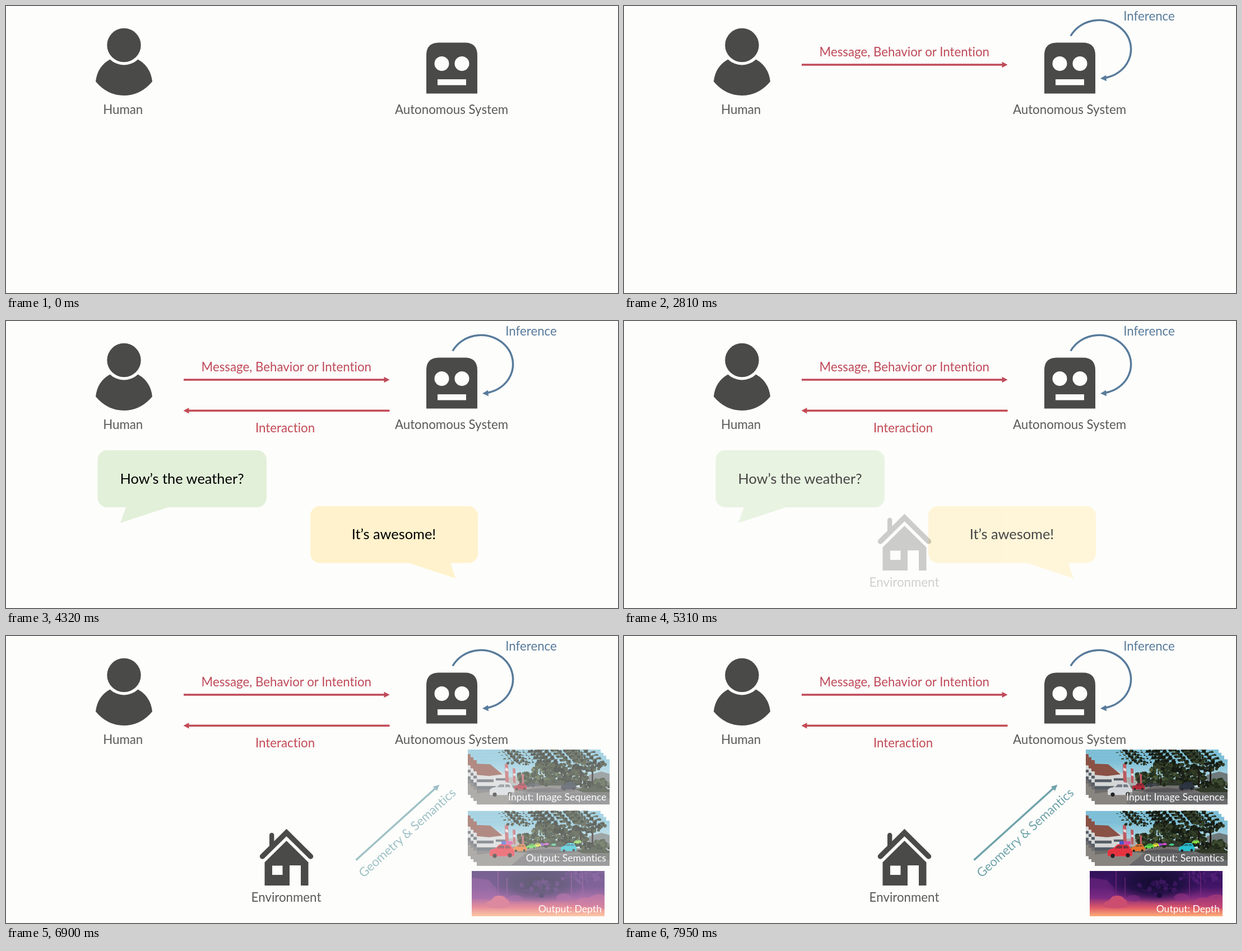
An HTML page that plays this animation: 1092 px wide and 513 px high, repeating every 7990 ms.

```html
<!DOCTYPE html>
<html lang="en">
<head>
<meta charset="utf-8">
<title>Human and autonomous system</title>
<style>
  html, body { margin: 0; width: 100%; height: 100%; overflow: hidden; background: #fdfdfb; }
  svg { display: block; width: 1092px; height: 513px; }
  text {
    font-family: Lato, Carlito, Calibri, sans-serif; font-size: 22.3px;
    font-variant-ligatures: none; text-anchor: middle;
  }
  .icon { fill: #4a4a49; }
  .label { fill: #595959; }
  .red { fill: #bf4a59; }
  .blue { fill: #587b9b; }
  .teal { fill: #6fa3aa; }
  .line { fill: none; stroke-width: 3.5; }
  .bubble text { font-size: 25.4px; fill: #000; }
  .caption { font-size: 17.6px; fill: #fff; text-anchor: end; }
  .step { opacity: 0; }
</style>
</head>
<body>
<svg viewBox="0 0 1092 513">
  <defs>
    <clipPath id="frame"><rect width="237" height="81"/></clipPath>
    <linearGradient id="sky" x2="0" y2="1">
      <stop stop-color="#79bdd6"/><stop offset=".6" stop-color="#c3e2e8"/>
    </linearGradient>
    <linearGradient id="road" x2="0" y2="1">
      <stop stop-color="#74716e"/><stop offset="1" stop-color="#67656a"/>
    </linearGradient>
    <linearGradient id="heat" x2="0" y2="1">
      <stop stop-color="#32115a"/><stop offset=".35" stop-color="#431568"/>
      <stop offset=".58" stop-color="#7d2a7f"/><stop offset=".8" stop-color="#dc5669"/>
      <stop offset="1" stop-color="#fdae78"/>
    </linearGradient>
    <radialGradient id="far">
      <stop stop-color="#120b2c"/><stop offset=".55" stop-color="#1d0f40" stop-opacity=".85"/>
      <stop offset="1" stop-color="#2a1150" stop-opacity="0"/>
    </radialGradient>
    <g id="car">
      <path d="M-22 9V1Q-20-3-12-4L-6-10Q-4-12 2-12H11Q16-12 19-4L22 0V8Q22 10 19 10H-20Z"/>
      <path d="M-9-4L-4-9H4V-4ZM6-4V-9H11Q14-9 15-4Z" fill="#26303a" opacity=".55"/>
      <circle cx="-13" cy="9" r="3.6" fill="#222"/><circle cx="14" cy="8" r="3.6" fill="#222"/>
    </g>
    <g id="street" clip-path="url(#frame)"></g>
  </defs>

  <g class="icon">
    <circle cx="210.5" cy="70" r="30.2"/>
    <path d="M185.5 95.5Q163 108 160 135Q181 160 210.5 160Q240 160 261 135Q258 108 235.5 95.5A36.5 36.5 0 0 1 185.5 95.5Z"/>
    <path fill-rule="evenodd" d="M750 156.5V88Q750 65.5 772 65.5H819Q841 65.5 841 88V156.5ZM764.5 103a13 13 0 1 0 26 0a13 13 0 1 0-26 0ZM800.5 103a13 13 0 1 0 26 0a13 13 0 1 0-26 0ZM770 131V141.5H821V131Z"/>
  </g>
  <text class="label" x="208.7" y="192.5">Human</text>
  <text class="label" x="795" y="193">Autonomous System</text>

  <g class="step" id="message">
    <path class="line" stroke="#bf4a59" d="M317 105H677"/>
    <path class="red" d="M684.5 105L674.5 99.7V110.3Z"/>
    <text class="red" x="500.3" y="89.5">Message, Behavior or Intention</text>
  </g>

  <g class="step" id="inference">
    <path class="line" stroke="#587b9b" d="M797 53.5A57 52 0 1 1 858 128.5"/>
    <path class="blue" d="M850 129.5L860 123.6L861 134.2Z"/>
    <text class="blue" x="937" y="26.3">Inference</text>
  </g>

  <g class="step" id="interaction">
    <path class="line" stroke="#c24a55" d="M324 160.3H684.5"/>
    <path fill="#c24a55" d="M316.5 160.3L326.5 155V165.6Z"/>
    <text fill="#c24a55" x="498" y="198.5">Interaction</text>
  </g>

  <g class="step bubble" id="talk">
    <path fill="#e2f0d9" d="M180.5 231H448a17 17 0 0 1 17 17V316a17 17 0 0 1-17 17H289L204 361L214 333H180.5a17 17 0 0 1-17-17V248a17 17 0 0 1 17-17Z"/>
    <text x="314" y="291">How’s the weather?</text>
    <path fill="#fff2cc" d="M560 331H825a17 17 0 0 1 17 17V415.5a17 17 0 0 1-17 17H793L802 460L719 432.5H560a17 17 0 0 1-17-17V348a17 17 0 0 1 17-17Z"/>
    <text x="692" y="390.3">It’s awesome!</text>
  </g>

  <g class="step" id="environment">
    <g class="icon">
      <path d="M457.500 394L500.500 351.400L543.500 394" fill="none" stroke="#4a4a49" stroke-width="9.5" stroke-linecap="round"/>
      <path d="M470 376V356a4.2 4.2 0 0 1 8.400 0V368Z"/>
      <path fill-rule="evenodd" d="M461.5 446V404.5L500.5 366L539.5 404.5V446H526V410H506V446ZM475 410.5V427H493.5V410.5Z"/>
    </g>
    <text class="label" x="500" y="475.3">Environment</text>
  </g>

  <g class="step" id="geometry">
    <path class="line" stroke="#6fa3aa" d="M624.5 400.5L768 270.5"/>
    <path class="teal" transform="translate(773.5 265.8) rotate(-42.2)" d="M0 0L-11-5.300V5.300Z"/>
    <text class="teal" transform="translate(716 352) rotate(-42.2)" y="7.5">Geometry &amp; Semantics</text>
    <g id="input"></g>
    <g id="semantics"></g>
    <g id="depth" transform="translate(831 420)" clip-path="url(#frame)"></g>
    <path fill="#6f7072" opacity=".6" d="M897 279H1077V301H897ZM930 388H1077V411H930Z"/>
    <text class="caption" x="1071.5" y="294">Input: Image Sequence</text>
    <text class="caption" x="1071" y="403">Output: Semantics</text>
    <text class="caption" x="1063" y="494.3">Output: Depth</text>
  </g>
</svg>

<script>
const LOOP = 7990, FADE = 500;
const $ = id => document.getElementById(id);

let seed = 7;
const rnd = () => (seed = seed * 16807 % 2147483647) / 2147483647;
const pick = list => list[Math.floor(rnd() * list.length)];

const shape = (d, fill, extra = '') => `<path d="${d}" fill="${fill}" ${extra}/>`;
const car = (x, y, s, fill) =>
  `<use href="#car" transform="translate(${x} ${y}) scale(${s})" fill="${fill}"/>`;

// Scattered leaf blobs filling an ellipse.
function leaves(cx, cy, rx, ry, count, colors, size = 2.4) {
  let out = '';
  for (let i = 0; i < count; i++) {
    const a = rnd() * 6.283, r = Math.sqrt(rnd());
    const x = cx + Math.cos(a) * r * rx, y = cy + Math.sin(a) * r * ry;
    out += `<circle cx="${x.toFixed(1)}" cy="${y.toFixed(1)}" r="${(size * (.5 + rnd())).toFixed(1)}" fill="${pick(colors)}"/>`;
  }
  return out;
}

function street() {
  const dark = ['#1b2219', '#28321f', '#343e26', '#151b13'];
  const mid = ['#2b3826', '#3d4b2e', '#222c1d', '#4d5a38'];
  let s = shape('M0 0H237V81H0Z', 'url(#sky)');
  s += shape('M0 81V52L90 44H140L237 58V81Z', 'url(#road)');
  s += shape('M0 61L45 56L100 48L60 81H0Z', '#88847f');
  s += shape('M0 20L28 14L52 27V52H0Z', '#d5d7d6');
  s += shape('M0 8L24 9L46 27L22 30L0 28Z', '#8a5145');
  s += shape('M0 36H30V41H0ZM34 34H52V38H34ZM0 48H52V54H0Z', '#545c64');
  s += shape('M52 32H92V47H52Z', '#a9adab');
  s += shape('M76 36H180V47H76Z', '#30372c');
  s += shape('M200 28L222 22L237 26V50H200Z', '#6f7a7c');
  s += leaves(84, 34, 14, 10, 55, mid);
  s += leaves(122, 25, 24, 21, 170, mid);
  s += leaves(84, 5, 34, 5, 35, dark, 1.8);
  s += leaves(168, 9, 62, 15, 240, dark);
  s += leaves(172, 32, 26, 14, 150, dark);
  s += leaves(214, 48, 28, 8, 120, dark);
  s += leaves(222, 40, 14, 5, 40, mid);
  s += shape('M117 30H119V46H117ZM184 18H187V50H184ZM205 20H208V46H205Z', '#1e1a16');
  s += shape('M176 54Q205 47 237 54V71Q205 66 176 54Z', '#303827');
  s += shape('M60 56L130 51L180 57L120 60ZM120 64L190 60L230 72H150Z', '#47474b', 'opacity=".6"');
  s += shape('M50 8L56 9L57 42L51 40ZM64 16L69 17V43L65 42ZM80 26L84 27V45H81Z', '#bd5a61');
  s += shape('M51 15L56 17V22L51 20ZM65 25L69 26V30L65 29Z', '#ead6d7');
  s += car(96, 46, .3, '#39404a') + car(107, 45, .26, '#454a52');
  s += car(164, 48, .62, '#2c3442');
  s += car(78, 49, .5, '#b02838') + car(45, 54, 1, '#d2d6da');
  return s;
}

function labels() {
  return car(115, 43, .24, '#a04be0') + car(124, 42, .2, '#e052d8') + car(137, 43, .2, '#50d890') +
    car(108, 44, .3, '#e6e03a') + car(97, 46, .38, '#5ad84a') + car(180, 38, .3, '#8be04a') +
    car(164, 48, .64, '#27bfd0') + car(77, 49, .56, '#e8782c') + car(45, 54, 1, '#e5333f') +
    shape('M44 37H52V43H44Z', '#4a58d0') + shape('M53 37H64V43H53Z', '#d0489c');
}

function depth() {
  let s = shape('M0 0H237V81H0Z', 'url(#heat)');
  s += shape('M0 12L30 16L44 30V50H0Z', '#7a2a86', 'opacity=".5"');
  s += '<ellipse cx="118" cy="20" rx="88" ry="38" fill="url(#far)"/>';
  s += leaves(122, 28, 34, 16, 40, ['#2c1250', '#1a0d3a', '#3a165c'], 3.5);
  s += leaves(200, 10, 40, 12, 50, ['#34125a', '#42186a', '#4f1d74'], 3.5);
  s += shape('M46 0H48V50H46ZM62 12H64V50H62ZM177 4H179V48H177ZM197 4H199V46H197Z', '#7c2a80', 'opacity=".6"');
  s += shape('M182 60Q190 44 208 48Q224 38 237 44V68Q205 66 182 60Z', '#b53e78', 'opacity=".6"');
  s += '<ellipse cx="164" cy="47" rx="13" ry="7" fill="#8d3180" opacity=".7"/>';
  s += '<ellipse cx="78" cy="49" rx="12" ry="6" fill="#7d2b7f" opacity=".7"/>';
  s += shape('M24 64Q23 55 34 53L40 46Q48 42 58 46L66 54Q69 60 65 65Q45 69 24 64Z', '#cb4e70');
  return s;
}

// Four overlapping copies, the last one in front.
const stack = (x, y, top = '') => [0, 5, 10, 16].map((d, i) =>
  `<g transform="translate(${x + d} ${y + d * 1.08})"><use href="#street"/>${i === 3 ? top : ''}</g>`).join('');

$('street').innerHTML = street();
$('input').innerHTML = stack(824, 203);
$('semantics').innerHTML = stack(824, 312.5, labels());
$('depth').innerHTML = depth();

// Group, fade-in start, fade-out start (ms).
const steps = [
  ['message', 780],
  ['inference', 2240],
  ['interaction', 3705],
  ['talk', 3705, 5175],
  ['environment', 5175],
  ['geometry', 6570]
];

for (const [id, start, end] of steps) {
  const key = (ms, opacity) => ({ offset: ms / LOOP, opacity });
  const keys = [key(0, 0), key(start, 0), key(start + FADE, 1)];
  if (end) keys.push(key(end, 1), key(end + FADE, 0));
  keys.push(key(LOOP, end ? 0 : 1));
  $(id).animate(keys, { duration: LOOP, iterations: Infinity });
}
</script>
</body>
</html>
```
